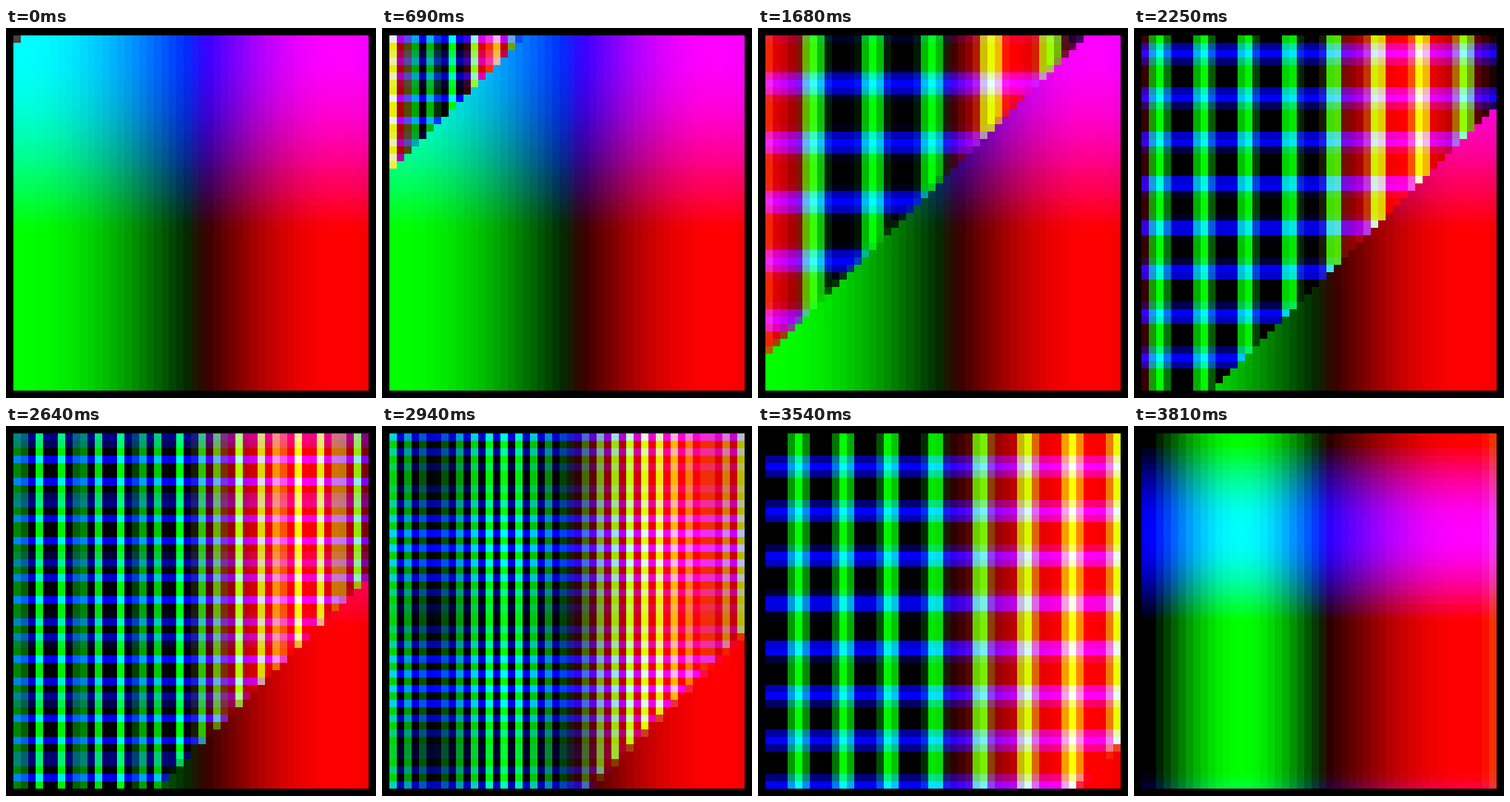
Write an HTML page with a canvas that moves like this. It is 500x500 px and loops after 3840 ms.

```html
<!DOCTYPE html>
<html lang="en">
<head>
<meta charset="utf-8">
<title>Colour waves</title>
<style>
html, body { margin: 0; width: 100%; height: 100%; overflow: hidden; background: #000; }
canvas { display: block; width: 500px; height: 500px; }
</style>
</head>
<body>
<canvas id="stage" width="500" height="500"></canvas>
<script>
const N = 48, CELL = 10, MARGIN = 10;
const FRAMES = 128, STEP = 30;
const T_START = 0.030184, T_STEP = 0.0976, T_STILL = 12.5;

const ctx = document.getElementById('stage').getContext('2d');
const clamp = v => Math.max(0, Math.min(1, v));
const level = s => 255 * clamp(0.1 + 0.9 * s);

// Per-axis waves: slow falls off as 1/t, fast rises with t and aliases on the grid.
function waves(t) {
  const slow = [], fast = [];
  for (let i = 0; i < N; i++) {
    const u = i - N / 2;
    slow.push(level(Math.sin(u / t)));
    fast.push(level(Math.sin(u * t)));
  }
  return { slow, fast };
}

const colour = (w, x, y) => [w.slow[x], w.fast[x], w.fast[y]];
const still = waves(T_STILL);

function draw(frame) {
  const live = waves(T_START + T_STEP * frame);
  const front = (frame + 1) * 2 * N / FRAMES;
  ctx.fillStyle = '#000';
  ctx.fillRect(0, 0, 500, 500);
  for (let y = 0; y < N; y++) {
    for (let x = 0; x < N; x++) {
      const mix = clamp(front - x - y);
      const a = colour(still, x, y), b = colour(live, x, y);
      const rgb = a.map((v, k) => Math.round(v + (b[k] - v) * mix));
      ctx.fillStyle = `rgb(${rgb})`;
      ctx.fillRect(MARGIN + x * CELL, MARGIN + y * CELL, CELL, CELL);
    }
  }
}

const start = performance.now();
let shown = -1;
function tick() {
  const frame = Math.floor((performance.now() - start) / STEP) % FRAMES;
  if (frame !== shown) draw(shown = frame);
  requestAnimationFrame(tick);
}
tick();
</script>
</body>
</html>
```
